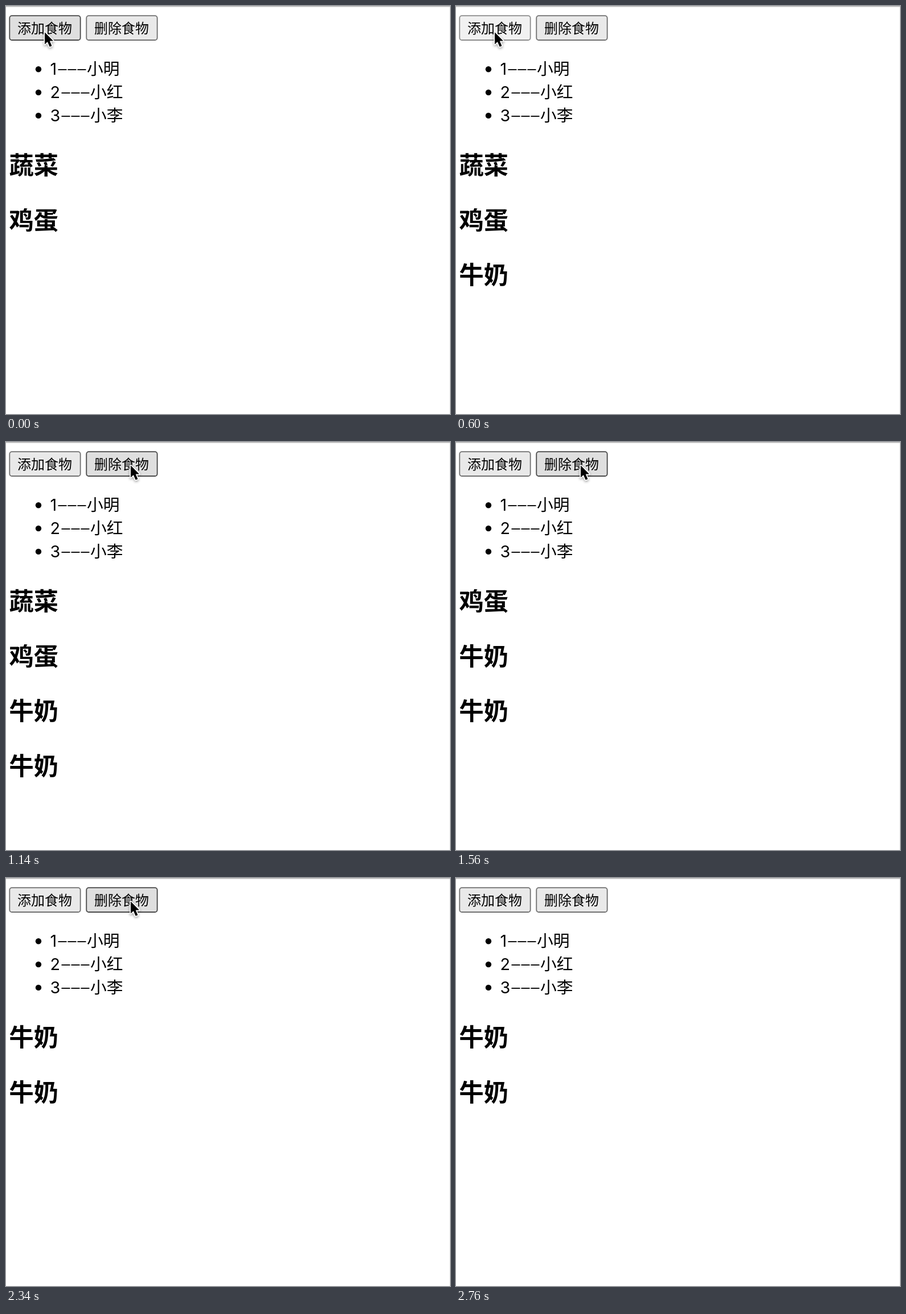
Animation, 780 px wide and 718 px high, one loop 2940 ms. Source, as an HTML page with a canvas:

```html
<!DOCTYPE html>
<html lang="zh-CN">
<head>
<meta charset="utf-8">
<title>食物列表</title>
<style>
html, body { margin: 0; width: 100%; height: 100%; overflow: hidden; background: #fff; }
canvas { display: block; }
</style>
</head>
<body>
<canvas id="stage" width="780" height="718"></canvas>
<script>
const ctx = document.getElementById('stage').getContext('2d');
const LOOP = 2940, STEP = 60;
const CJK = '"Noto Sans CJK SC", "Noto Sans CJK", sans-serif';

const people = ['小明', '小红', '小李'];
const buttons = [{ x: 6, label: '添加食物' }, { x: 141, label: '删除食物' }];

// Each click is pressed for one step; the list changes on release.
const adds = [60, 600];
const removals = [1440, 2220];

const looks = {
  normal: { fill: '#e9e9e9', line: '#707070' },
  hover: { fill: '#dfdfdf', line: '#484848' },
  pressed: { fill: '#f1f1f1', line: '#8c8c8c' }
};

const onAdd = { x: 66.5, y: 43 };
const onRemove = { x: 217.5, y: 38 };
const exit = { x: 78, y: 706 };

const progress = (t, from, to) => Math.min(1, Math.max(0, (t - from) / (to - from)));
const smooth = k => k * k * (3 - 2 * k);
const mix = (a, b, k) => ({ x: a.x + (b.x - a.x) * k, y: a.y + (b.y - a.y) * k });

function pointerAt(t) {
  if (t > 2700) return null;
  if (t > 2340) return mix(onRemove, exit, progress(t, 2340, 2700) ** 1.7);
  const k = progress(t, 780, 1140);
  const p = mix(onAdd, onRemove, smooth(k ** 0.85));
  p.y += 19 * Math.sin(Math.PI * k);
  return p;
}

function foodsAt(t) {
  const done = list => list.filter(at => t >= at + STEP).length;
  const milk = Array(done(adds)).fill('牛奶');
  return ['蔬菜', '鸡蛋', ...milk].slice(done(removals));
}

function lookOf(index, t, pointer) {
  const clicks = index ? removals : adds;
  if (clicks.some(at => t >= at && t < at + STEP)) return looks.pressed;
  const { x } = buttons[index];
  const over = pointer && pointer.x >= x && pointer.x <= x + 125 && pointer.y <= 60;
  return over ? looks.hover : looks.normal;
}

function text(str, x, y, font, spacing = 0) {
  ctx.font = font;
  ctx.letterSpacing = spacing + 'px';
  ctx.fillStyle = '#000';
  ctx.fillText(str, x, y);
}

function drawButton({ x, label }, look) {
  ctx.beginPath();
  ctx.roundRect(x + 0.3, 17.2, 124.4, 42.8, 4);
  ctx.fillStyle = look.fill;
  ctx.fill();
  ctx.lineWidth = 1.8;
  ctx.strokeStyle = look.line;
  ctx.stroke();
  text(label, x + 14, 47.7, '24px ' + CJK);
}

function drawPerson(name, i) {
  const y = 121 + i * 40.8;
  const shift = i === 0 ? 0 : 6;
  ctx.beginPath();
  ctx.arc(57, y - 9.7, 5.2, 0, Math.PI * 2);
  ctx.fillStyle = '#000';
  ctx.fill();
  text(i + 1, 77.5, y, '28.8px Inter, sans-serif');
  text('–––', 91.5 + shift, y - 2, '27px "Liberation Sans", sans-serif', 2);
  text(name, 142 + shift, y, '28.8px ' + CJK);
}

function drawPointer({ x, y }) {
  ctx.save();
  ctx.translate(x, y);
  ctx.lineJoin = 'round';
  ctx.lineWidth = 3.4;
  ctx.strokeStyle = '#fff';
  ctx.shadowColor = 'rgba(0,0,0,.4)';
  ctx.shadowBlur = 4;
  ctx.shadowOffsetY = 1.8;
  const shape = new Path2D('M1.6 3.2V24.4L6.4 20 10.2 28.8 14 27.2 10.3 18.5H16.6Z');
  ctx.stroke(shape);
  ctx.shadowColor = 'transparent';
  ctx.fillStyle = '#000';
  ctx.fill(shape);
  ctx.restore();
}

function draw(now) {
  const t = Math.floor((now % LOOP) / STEP) * STEP;
  const pointer = pointerAt(t);
  ctx.fillStyle = '#fff';
  ctx.fillRect(0, 0, 780, 718);
  ctx.fillStyle = '#b9b9b9';
  ctx.fillRect(0, 0, 780, 1.6);
  ctx.fillStyle = '#f1f1f1';
  ctx.fillRect(779, 2, 1, 716);
  buttons.forEach((b, i) => drawButton(b, lookOf(i, t, pointer)));
  people.forEach(drawPerson);
  foodsAt(t).forEach((food, i) => text(food, 5.5, 296 + i * 96.6, 'bold 43.2px ' + CJK));
  if (pointer) drawPointer(pointer);
}

let start;
function tick(now) {
  start ??= now;
  draw(now - start);
  requestAnimationFrame(tick);
}
draw(0);
requestAnimationFrame(tick);
</script>
</body>
</html>
```
